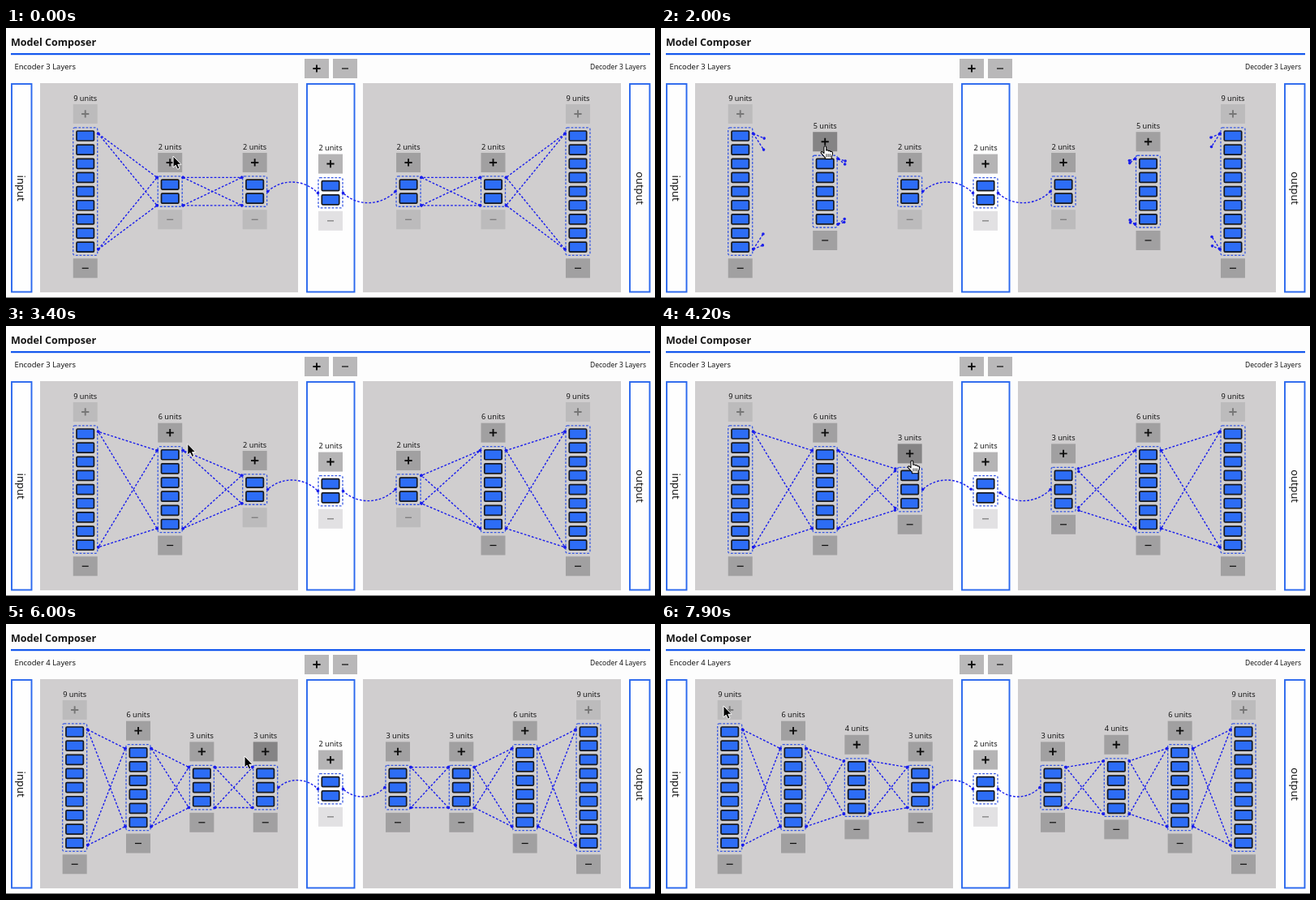
Write an HTML page that moves like this. It is 800 by 333 pixels and loops after 8000 ms.

```html
<!DOCTYPE html>
<html lang="en">
<head>
<meta charset="utf-8">
<title>Model Composer</title>
<style>
  html, body { margin: 0; width: 100%; height: 100%; overflow: hidden; background: #fdfdfd; }
  svg { display: block; width: 100vw; height: 100vh; }
  text { font-family: "Noto Sans", "Open Sans", sans-serif; fill: #161616; }
  .mid { text-anchor: middle; }
  .end { text-anchor: end; }
  .side { text-anchor: middle; font-weight: 500; }
  .frame { fill: #fefefe; stroke: #2a68ee; stroke-width: 1.9; }
  .panel { fill: #d0cecf; }
  .box { fill: none; stroke: #3a5ae2; stroke-width: 1.3; stroke-dasharray: 2.8 1.8; }
  .unit { fill: #2d6df6; stroke: #16181f; stroke-width: 1.7; }
  .link { fill: none; stroke: #1a1eec; stroke-width: 1.4; stroke-dasharray: 2.8 2; }
  .dot { fill: #1a1eec; }
</style>
</head>
<body>
<svg viewBox="0 0 800 333" preserveAspectRatio="none">
  <text x="6" y="22" font-size="12.55" font-weight="600">Model Composer</text>
  <rect x="6" y="31" width="788" height="2.2" fill="#1458ee"/>
  <rect class="frame" x="7" y="69" width="24.5" height="256.5"/>
  <rect class="panel" x="42" y="68" width="318" height="258"/>
  <rect class="frame" x="371" y="69" width="58.5" height="256.5"/>
  <rect class="panel" x="440" y="68" width="318" height="258"/>
  <rect class="frame" x="769" y="69" width="24.5" height="256.5"/>
  <text class="side" font-size="13" transform="translate(14.3 197.6) rotate(90)">input</text>
  <text class="side" font-size="12.8" transform="translate(777 197.6) rotate(90)">output</text>
  <rect y="332" width="800" height="1" fill="#777"/>
  <g id="scene"></g>
</svg>
<script>
const LOOP = 8000, MID_Y = 201.6, PITCH = 17.15, SPAN = 313.4;
const scene = document.getElementById('scene');

// start time, units per encoder layer, edited layer (-1 = all), delay between links
const STATES = [
  [0, [9, 2, 2], null, 0],
  [200, [9, 3, 2], 1, 3],
  [700, [9, 4, 2], 1, 10],
  [1750, [9, 5, 2], 1, 3],
  [2750, [9, 6, 2], 1, 3],
  [3695, [9, 6, 3], 2, 3],
  [5300, [9, 6, 3, 3], -1, 3],
  [6500, [9, 6, 4, 3], 2, 3]
];
// moments when the interface stalls
const STALLS = [[300, 700], [5100, 5300]];
// from, to, hand cursor until, button
const HOVERS = [
  [100, 3380, 3380, 1],
  [3580, 4320, 4320, 2],
  [4780, 5560, 5560, 'top'],
  [5850, 6060, 5950, 3],
  [6260, 6960, 6960, 2]
];
// time, x, y of the pointer tip
const PATH = [
  [0, 206, 158], [300, 206, 160], [1300, 205, 160], [1900, 203, 146],
  [2600, 202, 141], [3300, 202, 140], [3650, 310, 166], [4230, 310, 166],
  [4900, 379, 53], [5480, 379, 53], [6000, 294, 163], [6350, 244, 157],
  [6880, 243, 157], [7750, 77, 101], [8000, 77, 101]
];
const ARROW = 'M0 0V14L3.2 11.2L5.5 16.2L8 15.1L5.8 10.3H10Z';
const HAND = 'M-2 1.5C-2-.5 .8-.5 .8 1.5V5.3C2 4.6 3.2 5 3.4 6C4.6 5.3 5.8 5.8 6 6.9' +
  'C7.4 6.3 8.6 7 8.6 8.6C8.6 11 7.6 12.4 7.2 13.2V15.8H-.6V14C-2.4 12.4-3.6 10.6-5.6 8.6' +
  'C-6.4 7.4-4.8 6.2-3.4 7.4L-2 8.8Z';

const lerp = (a, b, k) => a + (b - a) * k;
const clamp = k => Math.max(0, Math.min(1, k));
const mix = (p, q, k) => [lerp(p[0], q[0], k), lerp(p[1], q[1], k)];
const pt = p => p[0].toFixed(2) + ' ' + p[1].toFixed(2);

// cubic-bezier(.58, 0, .36, 1)
function drawEase(k) {
  if (k <= 0 || k >= 1) return clamp(k);
  let lo = 0, hi = 1;
  for (let i = 0; i < 20; i++) {
    const u = (lo + hi) / 2, v = 1 - u;
    const x = 3 * u * v * v * .58 + 3 * u * u * v * .36 + u * u * u;
    if (x < k) lo = u; else hi = u;
  }
  return lo * lo * (3 - 2 * lo);
}

function text(x, y, size, str, cls = '') {
  return `<text class="${cls}" x="${x}" y="${y}" font-size="${size}">${str}</text>`;
}

function button(cx, cy, sign, fill, ink = '#0c0c0c') {
  const icon = sign === '+'
    ? `<path d="M${cx - 4.6} ${cy}h9.2M${cx} ${cy - 4.6}v9.2" stroke="${ink}" stroke-width="1.9"/>`
    : `<path d="M${cx - 4} ${cy}h8" stroke="${ink}" stroke-width="1.2"/>`;
  return `<rect x="${cx - 15}" y="${cy - 12}" width="30" height="24" fill="${fill}"/>` + icon;
}

function span(n, cy = MID_Y) {
  const h = n * PITCH + 4;
  return { top: cy - h / 2, bottom: cy + h / 2, h };
}

function column(cx, n, hovered, cy = MID_Y, on = '#a1a0a1', off = '#bcbbbc') {
  const { top, bottom, h } = span(n, cy);
  const key = (y, sign, enabled) =>
    button(cx, y, sign, !enabled ? off : sign === '+' && hovered ? '#858485' : on, enabled ? undefined : '#777');
  let out = text(cx, top - 32.9, 9.2, n + ' units', 'mid');
  out += key(top - 16.5, '+', n < 9) + key(bottom + 15.5, '−', n > 2);
  out += `<rect class="box" x="${cx - 15}" y="${top + .5}" width="30" height="${h - 1}" rx="2"/>`;
  for (let i = 0; i < n; i++) {
    const y = top + 2 + PITCH * (i + .5);
    out += `<rect class="unit" x="${cx - 10.7}" y="${y - 6}" width="21.4" height="12" rx="1.2"/>`;
  }
  return out;
}

// the first part of a cubic, with a dot at both ends
function link(a, b, bend, k, phase) {
  if (k <= 0) return '';
  const c = mix(a, b, bend ? .28 : 1 / 3), d = mix(a, b, bend ? .72 : 2 / 3);
  c[1] += bend;
  d[1] += bend;
  const ac = mix(a, c, k), cd = mix(c, d, k), db = mix(d, b, k);
  const m = mix(ac, cd, k), tip = mix(m, mix(cd, db, k), k);
  const dot = p => `<circle class="dot" cx="${p[0]}" cy="${p[1]}" r="1.8"/>`;
  return `<path class="link" stroke-dashoffset="${phase}" d="M${pt(a)}C${pt(ac)} ${pt(m)} ${pt(tip)}"/>` + dot(a) + dot(tip);
}

function layerX(side, k, count) {
  const d = SPAN * (k + .5) / count;
  return side > 0 ? 45.5 + d : 757.2 - d;
}

function links(t, [start, units, edited, gap]) {
  const n = units.length, phase = -(t / 1000 % 1) * 4.8;
  let out = '', order = 0;
  const add = (a, b, bend, fresh) => {
    const k = fresh ? drawEase((t - start - 85 - gap * order++) / 500) : 1;
    out += link(a, b, bend, k, phase);
  };
  const rows = count => {
    const s = span(count);
    return [s.top + s.h * .05, s.bottom - s.h * .05];
  };
  for (let j = 0; j < n; j++) {
    const fresh = edited === -1 || edited !== null && (edited === j || edited === j + 1);
    for (const side of [1, -1]) {
      const x = layerX(side, j, n) + side * 16;
      if (j === n - 1) {
        const end = 400 - side * 15.5;
        add([x, MID_Y], [end, 203.5], -side * .27 * Math.abs(end - x), fresh);
        continue;
      }
      const x2 = layerX(side, j + 1, n) - side * 16;
      for (const y of rows(units[j]))
        for (const y2 of rows(units[j + 1])) add([x, y], [x2, y2], 0, fresh);
    }
  }
  return out;
}

function pointer(t, hand) {
  const i = Math.max(1, PATH.findIndex(p => p[0] >= t));
  const a = PATH[i - 1], b = PATH[i];
  const k = clamp((t - a[0]) / (b[0] - a[0])), e = k * k * (3 - 2 * k);
  const at = `transform="translate(${lerp(a[1], b[1], e)} ${lerp(a[2], b[2], e)})"`;
  return hand
    ? `<path ${at} d="${HAND}" fill="#fff" stroke="#000" stroke-width="1.1" stroke-linejoin="round"/>` +
      `<path ${at} d="M1 9.5v4M3.2 9.5v4M5.4 9.5v4" stroke="#000" stroke-width=".8"/>`
    : `<path ${at} d="${ARROW}" fill="#000" stroke="#fff" stroke-width="1" stroke-linejoin="round"/>`;
}

function render(time) {
  let t = time;
  for (const [from, to] of STALLS) if (t >= from && t < to) t = from;
  const state = STATES.filter(s => s[0] <= t).pop();
  const hover = HOVERS.find(h => t >= h[0] && t < h[1]);
  const target = hover ? hover[3] : null;
  const units = state[1], n = units.length;

  let out = text(10.5, 50.5, 9.45, `Encoder ${n} Layers`) + text(789, 50.5, 8.5, `Decoder ${n} Layers`, 'end');
  out += button(383, 50, '+', target === 'top' ? '#8f8e8f' : '#b9b8b9') + button(418, 50, '−', '#b9b8b9');
  units.forEach((count, k) => {
    out += column(layerX(1, k, n), count, target === k) + column(layerX(-1, k, n), count, false);
  });
  out += column(400, 2, false, 203.2, '#b5b4b5', '#e2e1e3');
  out += links(t, state) + pointer(t, hover && t < hover[2]);
  scene.innerHTML = out;
}

const began = performance.now();
function tick() {
  render((performance.now() - began) % LOOP);
  requestAnimationFrame(tick);
}
tick();
</script>
</body>
</html>
```
